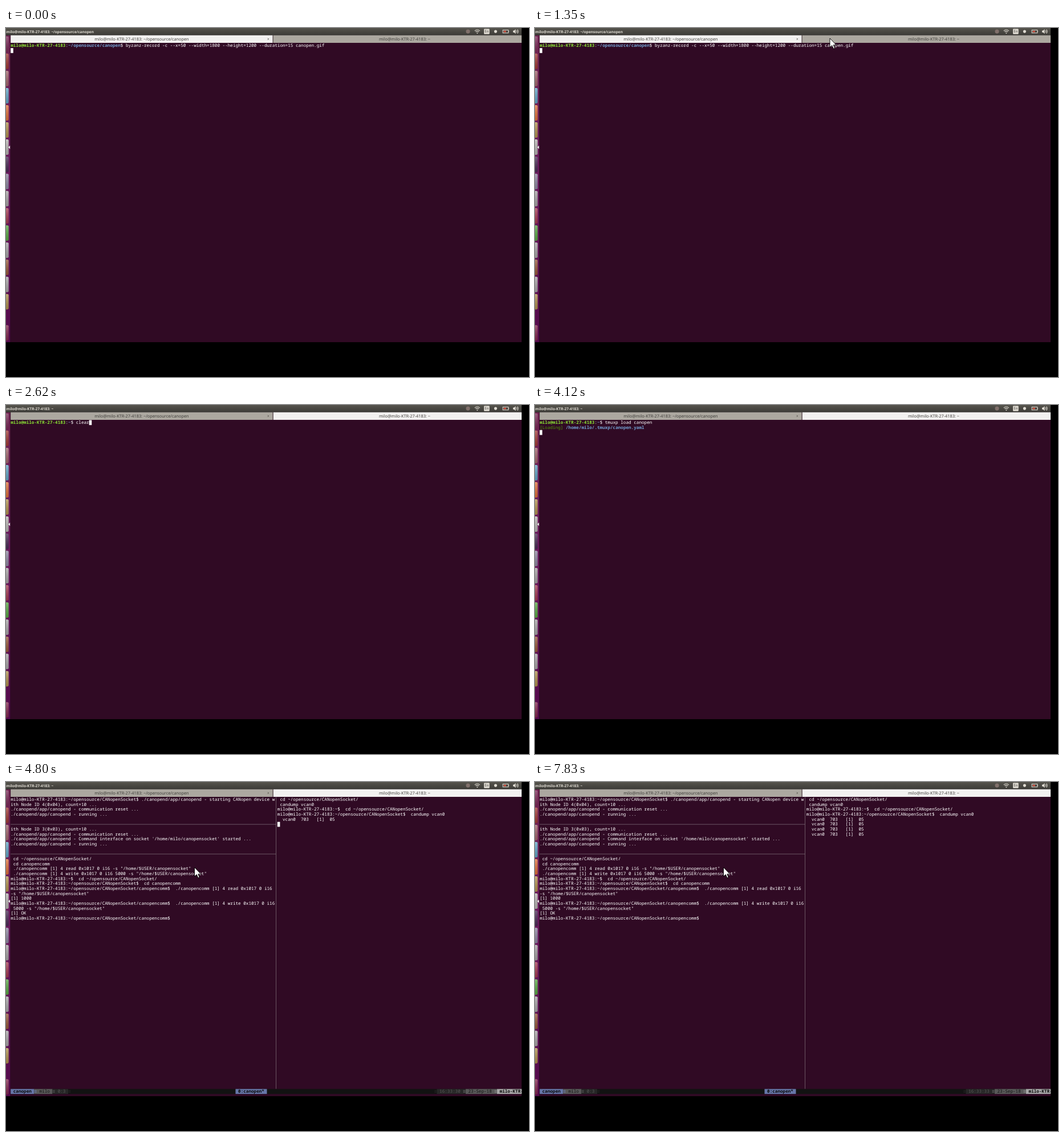
These frames come from a looping animation (917x611 px, 8 s). An HTML page:

```html
<!DOCTYPE html>
<html lang="en">
<head>
<meta charset="utf-8">
<title>Terminal session</title>
<style>
  html, body { margin: 0; width: 100%; height: 100%; overflow: hidden; background: #000; }
  svg { display: block; width: 917px; height: 611px; }
  text { white-space: pre; text-rendering: geometricPrecision; }
  .mono { font: 15px "Noto Sans Mono", monospace; fill: #fff; }
  .ui { font: 14.4px "Open Sans", sans-serif; fill: #3c3b37; text-anchor: middle; }
  .title { font: bold 12.74px "Open Sans", sans-serif; fill: #dfdbd2; }
  .b { font-weight: bold; }
  .user { font-weight: bold; fill: #8ae234; }
  .path { font-weight: bold; fill: #729fcf; }
  .ok { fill: #4e9a06; }
</style>
</head>
<body>
<svg viewBox="0 0 1800 1199.35" preserveAspectRatio="none">
  <defs>
    <linearGradient id="panel" x2="0" y2="1">
      <stop offset="0" stop-color="#56544d"/><stop offset="1" stop-color="#3c3b37"/>
    </linearGradient>
    <linearGradient id="dock" x2="0" y2="1">
      <stop offset="0" stop-color="#6e2350"/><stop offset=".4" stop-color="#6a1a5c"/>
      <stop offset="1" stop-color="#540a4c"/>
    </linearGradient>
    <linearGradient id="sheen" x2="0" y2="1">
      <stop offset="0" stop-color="#fff" stop-opacity=".25"/><stop offset="1" stop-color="#000" stop-opacity=".15"/>
    </linearGradient>
    <clipPath id="screen"><rect width="1775" height="1080"/></clipPath>
  </defs>
  <g clip-path="url(#screen)">
    <rect y="25" width="15" height="1055" fill="url(#dock)"/>
    <g id="icons"></g>
    <path d="M14 404v12l-6-6z" fill="#eee"/>
    <rect x="15" y="25" width="1760" height="1055" fill="#300a24"/>
    <rect width="1775" height="25" fill="url(#panel)"/>
    <g id="tray" fill="#dfdbd2">
      <circle cx="1590" cy="12" r="7" fill="#80706b"/>
      <g fill="none" stroke="#dfdbd2" stroke-width="2">
        <path d="M1613 10q9-8 18 0M1616.5 13.5q5.500-5 11 0"/>
        <path d="M1710 7h19v10h-19zM1730 10v4"/>
        <path d="M1757 8q4 4 0 8M1760 5q6 7 0 14"/>
      </g>
      <path d="M1619 16h6l-3 4z"/>
      <rect x="1645" y="3" width="19" height="18" rx="2"/>
      <text class="ui" x="1654.500" y="16.500" style="font-size:12px">En</text>
      <circle cx="1685" cy="12" r="5"/>
      <rect x="1713" y="9.500" width="8" height="5" fill="#df5b4a"/>
      <path d="M1745 9h4l5-5v16l-5-5h-4z"/>
    </g>
    <rect id="tab1" x="16" y="25" width="902" height="26"/>
    <rect id="tab2" x="920" y="25" width="855" height="26"/>
    <path d="M919 25v26" stroke="#77736c" stroke-width="2"/>
    <path d="M900 35.500l5 5m0-5l-5 5" stroke="#55524c" stroke-width="1.500"/>
    <g id="term"></g>
    <rect id="caret" width="9" height="17" fill="#fff"/>
    <path id="arrow" d="M0 0V31L7.500 24.500 12.500 36 17 34 12.500 23H22Z" fill="#fff" stroke="#000" stroke-width="1.800"/>
    <g id="beam" fill="none">
      <path d="M-7-13q6 0 7 3q1-3 7-3M0-10V10M-7 13q6 0 7-3q1 3 7 3M-3 4h6" stroke="#fff" stroke-width="4.500"/>
      <path d="M-7-13q6 0 7 3q1-3 7-3M0-10V10M-7 13q6 0 7-3q1 3 7 3M-3 4h6" stroke="#000" stroke-width="2"/>
    </g>
  </g>
</svg>
<script>
const LOOP = 8000, SCALE = 917 / 1800, CW = 9, CH = 17, X0 = 16, Y0 = 52;
const USER = 'milo', HOST = 'milo-KTR-27-4183', WHO = USER + '@' + HOST;
const $ = id => document.getElementById(id);
const term = $('term'), timed = [];

function add(parent, tag, attrs, text) {
  const node = document.createElementNS('http://www.w3.org/2000/svg', tag);
  for (const key in attrs) node.setAttribute(key, attrs[key]);
  if (text !== undefined) node.textContent = text;
  return parent.appendChild(node);
}

// Node is visible from one time to another
function during(from, to, node) {
  timed.push({ from, to, node });
  return node;
}
const scene = (from, to) => during(from, to, add(term, 'g', {}));

// Spans are plain strings or [text, class] pairs
function line(parent, col, row, ...spans) {
  const node = add(parent, 'text', { class: 'mono', x: X0 + col * CW, y: Y0 + row * CH + 13 });
  for (const span of spans) {
    const [text, cls] = [].concat(span);
    add(node, 'tspan', cls ? { class: cls } : {}, text);
  }
  return node;
}
const lines = (parent, col, row, list) => list.forEach((s, i) => s && line(parent, col, row + i, s));
const prompt = dir => [[WHO, 'user'], ':', [dir, 'path'], '$ '];

// Dock tiles
const tiles = ['#7b2c58', '#a03a35', '#a2656d', '#62a5c8', '#e0703a', '#b3934f', '#b9b6b4', '#4a2a55',
  '#8f86a3', '#a8a3a6', '#a43a52', '#58a844', '#a9a5a9', '#97573a', '#aaa5a8', '#b0914f', '#82284f'];
tiles.forEach((fill, i) => {
  const y = i < 16 ? 29 + i * 59 : 1021;
  for (const paint of [fill, 'url(#sheen)'])
    add($('icons'), 'rect', { x: -10, y, width: 19, height: 53, rx: 4, fill: paint });
});

// Window title and tabs
const LONG = WHO + ': ~/opensource/canopen', SHORT = WHO + ': ~';
const title = add(term, 'text', { class: 'title', x: 1, y: 17 });
add(term, 'text', { class: 'ui', x: 467, y: 43 }, LONG);
add(term, 'text', { class: 'ui', x: 1372, y: 43 }, SHORT);

// Recording tab
line(scene(0, 1670), 0, 0, ...prompt('~/opensource/canopen'),
  'byzanz-record -c --x=50 --width=1800 --height=1200 --duration=15 canopen.gif');

// Shell tab
const shell = scene(1670, 4200);
line(shell, 0, 0, ...prompt('~'));
const typed = line(shell, 25, 0);
during(4120, 4200, line(shell, 0, 1, ['[Loading]', 'ok'], ' ',
  ['/home/' + USER + '/.tmuxp/canopen.yaml', 'path']));

// Split panes
const frame = scene(4200, LOOP), panes = scene(4270, LOOP);
add(frame, 'path', { d: 'M929.500 52V1055M16 145.500H929M16 247.500H929', stroke: '#85757f', 'stroke-width': 1.4, fill: 'none' });

const APP = './canopend/app/canopend - ', SOCK = '"/home/$USER/canopensocket"';
const REPO = '~/opensource/CANopenSocket', COMM = WHO + ':' + REPO + '/canopencomm$';
const READ = ' ./canopencomm [1] 4 read 0x1017 0 i16', WRITE = ' ./canopencomm [1] 4 write 0x1017 0 i16';
lines(panes, 0, 0, [
  WHO + ':' + REPO + '$ ' + APP + 'starting CANopen device w',
  'ith Node ID 4(0x04), count=10 ...',
  APP + 'communication reset ...',
  APP + 'running ...',
  '', '',
  'ith Node ID 3(0x03), count=10 ...',
  APP + 'communication reset ...',
  APP + "Command interface on socket '/home/" + USER + "/canopensocket' started ...",
  APP + 'running ...',
  '', '',
  ' cd ' + REPO + '/',
  ' cd canopencomm',
  READ + ' -s ' + SOCK,
  WRITE + ' 5000 -s ' + SOCK,
  WHO + ':~$  cd ' + REPO + '/',
  WHO + ':' + REPO + '$  cd canopencomm',
  COMM + ' ' + READ,
  '-s ' + SOCK,
  '[1] 1000',
  COMM + ' ' + WRITE,
  ' 5000 -s ' + SOCK,
  '[1] OK',
  COMM
]);
lines(panes, 102, 0, [
  ' cd ' + REPO + '/',
  ' candump vcan0',
  WHO + ':~$  cd ' + REPO + '/',
  WHO + ':' + REPO + '$  candump vcan0'
]);
[4640, 5620, 6640, 7590].forEach((t, i) =>
  during(t, LOOP, line(panes, 102, 4 + i, '  vcan0  703   [1]  05')));

// Status bar
const BAR = 59;
function segment(col, width, bg, fg, text, cls = '') {
  add(frame, 'rect', { x: X0 + col * CW, y: Y0 + BAR * CH, width: width * CW, height: CH, fill: bg });
  const node = line(frame, col + 1, BAR);
  node.setAttribute('class', 'mono ' + cls);
  node.style.fill = fg;
  node.textContent = text;
  return node;
}
function mark(col, fill) {
  for (const [x, y] of [[1, 4], [5, 4], [1, 9], [5, 9]])
    add(frame, 'rect', { x: X0 + col * CW + x, y: Y0 + BAR * CH + y, width: 2.5, height: 3.5, fill });
}
segment(0, 196, '#121212', '#000', '');
segment(0, 9, '#6676a8', '#080808', 'canopen', 'b');
segment(9, 7, '#585858', '#121212', '');
line(frame, 11, BAR, USER).style.fill = '#121212';
segment(16, 6, '#262626', '#585858', ' 0:3');
segment(86, 12, '#6676a8', '#080808', '0:canopen*', 'b');
const clock = segment(163, 11, '#262626', '#585858', '');
segment(174, 12, '#585858', '#121212', '23-Sep-18');
segment(186, 10, '#a8a8a8', '#080808', HOST, 'b');
mark(9, '#6676a8');
mark(16, '#585858');
mark(22, '#262626');
mark(162, '#262626');
mark(173, '#686868');
mark(185, '#8a8a8a');

// Each list holds [time, ...state]; a state lasts until the next one
const at = (list, t) => list.findLast(s => s[0] <= t);
const carets = [
  [0, 0, 1], [530], [1130, 0, 1], [1670, 25, 0], [2200], [2620, 30, 0], [3110, 43, 0], [3600],
  [3850, 0, 1], [4120, 0, 2], [4200], [4800, 102, 5], [5380], [6000, 102, 6], [6640],
  [7180, 102, 7], [7590, 102, 8], [7830]
];
const pointers = [
  [0], [440, 'beam', 525, 53], [620, 'beam', 523, 46], [700, 'beam', 521, 39], [790, 'beam', 519.5, 33],
  [880, 'beam', 518.5, 28.5], [950, 'arrow', 518.5, 23], [1040, 'arrow', 519, 18],
  [1280, 'arrow', 522, 24], [1350, 'arrow', 517, 18], [1430, 'arrow', 513.5, 14.5],
  [1910, 'beam', 506, 42], [1980, 'beam', 505, 71], [2050, 'beam', 511, 67], [2620],
  [4340, 'arrow', 345, 172], [4420, 'arrow', 338, 162], [4490, 'arrow', 333, 154], [4560, 'arrow', 330.5, 149.5]
];
const inputs = [[0, ''], [2620, 'clear'], [3110, 'tmuxp load canopen']];
const seconds = [[0, 30], [5120, 31], [6080, 32], [7060, 33]];

function place(node, on, x, y) {
  node.style.display = on ? '' : 'none';
  if (on) node.setAttribute('transform', `translate(${x} ${y})`);
}

function draw(now) {
  const t = now % LOOP, first = t < 1670;
  for (const { from, to, node } of timed) node.style.display = t >= from && t < to ? '' : 'none';
  title.textContent = first ? LONG : SHORT;
  $('tab1').setAttribute('fill', first ? '#f2f1f0' : '#aca8a0');
  $('tab2').setAttribute('fill', first ? '#aca8a0' : '#f2f1f0');
  typed.textContent = at(inputs, t)[1];
  clock.textContent = '16:33:' + at(seconds, t)[1];
  const [, col, row] = at(carets, t);
  place($('caret'), col !== undefined, X0 + col * CW, Y0 + row * CH);
  const [, shape, x, y] = at(pointers, t);
  for (const id of ['arrow', 'beam']) place($(id), shape === id, x / SCALE, y / SCALE);
}

const start = performance.now();
function tick() {
  draw(performance.now() - start);
  requestAnimationFrame(tick);
}
tick();
</script>
</body>
</html>
```
